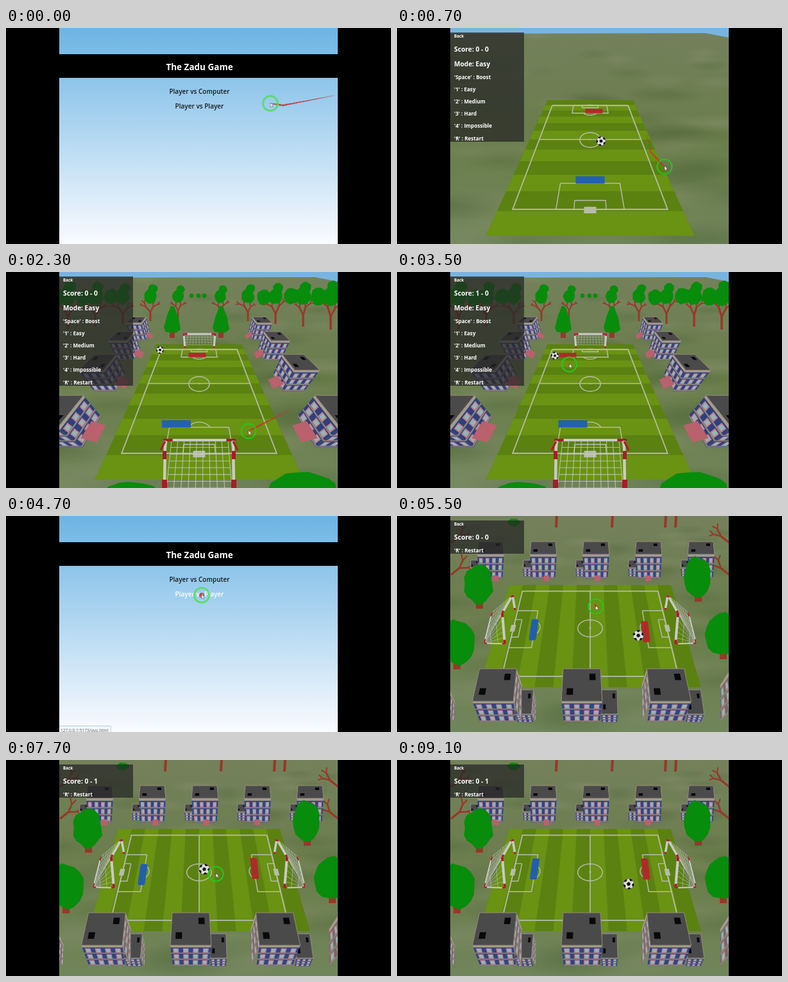
An HTML page with a canvas for the animation above (9.2 s loop, 600 by 338 pixels).

```html
<!DOCTYPE html>
<html lang="en">
<head>
<meta charset="utf-8">
<title>The Zadu Game</title>
<style>
html, body { margin: 0; width: 100%; height: 100%; overflow: hidden; background: #000; }
canvas { display: block; }
</style>
</head>
<body>
<canvas id="stage" width="600" height="338"></canvas>
<script>
const g = document.getElementById('stage').getContext('2d');
const LOOP = 9200, STEP = 100, TAU = Math.PI * 2, MID = 301;
const LEAF = '#078c0c', BARK = '#963828', CHALK = '#b5bda8', POLE = '#c9cac6', RED = '#a81c2b', INK = '#08090a';

const rnd = n => { const s = Math.sin(n * 12.9898) * 43758.5453; return s - Math.floor(s); };
const mix = (a, b, k) => a.map((v, i) => v + (b[i] - v) * k);

// Linear interpolation through keys of the form [time, ...values]
function at(keys, t) {
  const i = keys.findIndex(k => k[0] > t);
  if (i < 0) return keys[keys.length - 1].slice(1);
  if (!i) return keys[0].slice(1);
  const a = keys[i - 1], b = keys[i];
  return mix(a, b, (t - a[0]) / (b[0] - a[0])).slice(1);
}

function path(pts, close) {
  g.beginPath();
  pts.forEach(p => g.lineTo(p[0], p[1]));
  if (close) g.closePath();
}
function fill(pts, color) { path(pts, true); g.fillStyle = color; g.fill(); }
function line(pts, color, width) { path(pts); stroke(color, width); }
function stroke(color, width) { g.strokeStyle = color; g.lineWidth = width; g.stroke(); }
function ring(x, y, r, color, width) { g.beginPath(); g.arc(x, y, r, 0, TAU); stroke(color, width); }
function rect(x, y, w, h, color) { g.fillStyle = color; g.fillRect(x, y, w, h); }
function text(s, x, y, size, color = '#fff', weight = 700, align = 'left') {
  g.font = `${weight} ${size}px "Open Sans", "Noto Sans", sans-serif`;
  g.textAlign = align;
  g.fillStyle = color;
  g.fillText(s, x, y);
}

// ---- pitch ----
// Maps the ground rectangle [-1,1] x [-1,1] to a trapezium in perspective
const camera = (w0, w1, y0, y1) => (u, v) => {
  const w = 1 / (1 / w0 + (1 / w1 - 1 / w0) * (v + 1) / 2);
  return [MID + u * w, y0 + (w - w0) / (w1 - w0) * (y1 - y0)];
};
const lengthwise = camera(66.5, 162.5, 113, 325);
const across = camera(126, 173, 108, 268);
const sideways = (a, b) => across(-b, a);

function arc(P, cb, from, to, width) {
  const pts = [];
  for (let i = 0; i <= 40; i++) {
    const q = from + (to - from) * i / 40;
    pts.push(P(0.17 * Math.cos(q), cb + 0.132 * Math.sin(q)));
  }
  line(pts, CHALK, width);
}

function pitch(P) {
  const quad = (a, b0, b1) => [P(-a, b0), P(a, b0), P(a, b1), P(-a, b1)];
  const box = (a, b0, b1, w) => { const q = quad(a, b0, b1); line([...q, q[0]], CHALK, w); };
  fill(quad(1, -1, 1), '#5b8111');
  for (let i = 1; i < 12; i += 2) fill(quad(1, i / 6 - 1, (i + 1) / 6 - 1), '#6a9213');
  box(0.84, -0.82, 0.82, 1.8);
  line([P(-0.84, 0), P(0.84, 0)], CHALK, 1.6);
  arc(P, 0, 0, TAU, 1.5);
  fill(quad(0.012, -0.01, 0.01), CHALK);
  for (const s of [-1, 1]) {
    box(0.37, s * 0.59, s * 0.82, 1.5);
    box(0.175, s * 0.748, s * 0.82, 1.4);
    fill(quad(0.066, s * 0.8, s * 0.85), CHALK);
    const mid = s > 0 ? Math.PI * 1.5 : Math.PI / 2;
    arc(P, s * 0.667, mid - 0.94, mid + 0.94, 1.4);
  }
}

function ground(seed) {
  const base = g.createLinearGradient(0, 0, 0, 338);
  ['#74815c', '#6a7d4b', '#71855a'].forEach((c, i) => base.addColorStop(i / 2, c));
  rect(83, 0, 434, 338, base);
  for (let i = 0; i < 60; i++) {
    const y = 12 + rnd(seed + i) * 326, r = 8 + y / 10;
    g.save();
    g.translate(83 + rnd(seed + i + 99) * 434, y);
    g.scale(2.5, 0.7);
    const blob = g.createRadialGradient(0, 0, 0, 0, 0, r);
    const c = i % 2 ? '60,85,40' : '150,155,125';
    blob.addColorStop(0, `rgba(${c},.2)`);
    blob.addColorStop(1, `rgba(${c},0)`);
    rect(-r, -r, 2 * r, 2 * r, blob);
    g.restore();
  }
}

// ---- trees ----
function leaf(x, y, rx, ry) {
  const pts = [];
  for (let i = 0; i < 18; i++) {
    const q = i / 18 * TAU, k = 0.9 + 0.17 * rnd(x + i);
    pts.push([x + rx * k * Math.cos(q), y + ry * k * Math.sin(q)]);
  }
  fill(pts, LEAF);
}

function tree(x, y, rx, ry) {
  rect(x - 4, y + ry - 6, 11, 13, BARK);
  leaf(x, y, rx, ry);
}

function branch(x, y, len, dir, depth, seed) {
  const x2 = x + Math.cos(dir) * len, y2 = y + Math.sin(dir) * len;
  line([[x, y], [x2, y2]], BARK, 0.8 + len / 7);
  if (!depth) return;
  for (const s of [-1, 1])
    branch(x2, y2, len * (0.6 + 0.2 * rnd(seed + s)), dir + s * (0.3 + 0.4 * rnd(seed * 2 + s)), depth - 1, seed * 2 + s);
}

// Row of trees, growing towards both edges of the stage
function forest() {
  for (let i = -5; i <= 5; i++) {
    const far = Math.abs(i) / 5, x = MID + i * 43 - Math.sign(i) * 10, size = 8 + 5 * far;
    if (!i) {
      for (const dx of [-12, -1, 8]) leaf(x + dx, 37, 3.5, 3.5);
      continue;
    }
    branch(x, 68 + 22 * far, 10 + 10 * far, -Math.PI / 2, 3, i + 9);
    leaf(x, 38, size, size * 1.15);
    leaf(x + 4, 37 - size * 1.1, size * 0.75, size * 0.7);
    if (far > 0.5) leaf(x - 18, 33 + 12 * rnd(i), size, size * 1.1);
  }
}

function fir(x) {
  rect(x - 4, 91, 8, 12, BARK);
  fill([[x - 2, 53], [x + 3, 54], [x + 10, 72], [x + 13, 90], [x + 6, 95], [x - 10, 94], [x - 13, 87], [x - 8, 68]], LEAF);
}

// ---- houses ----
// Wall with three rows of windows inside the quad q (clockwise from top left)
function wall(q, cols, color = '#34447f') {
  const p = (u, v) => mix(mix(q[0], q[1], u), mix(q[3], q[2], u), v);
  const part = (u, v, w, h, c) => fill([p(u, v), p(u + w, v), p(u + w, v + h), p(u, v + h)], c);
  fill(q, color);
  part(0, 0, 1, 0.1, '#a69b89');
  for (let r = 0; r < 3; r++) {
    const v = 0.15 + r * 0.29;
    part(0, v + 0.21, 1, 0.05, '#8d867e');
    for (let c = 0; c < cols; c++) {
      const u = (c + 0.22) / cols, w = 0.56 / cols;
      part(u, v, w, 0.21, '#bd7f88');
      part(u + w * 0.18, v + 0.03, w * 0.64, 0.15, '#93b5b8');
    }
  }
}

function roof(q) {
  const tile = (u, v) => {
    const p = (a, b) => mix(mix(q[0], q[1], a), mix(q[3], q[2], a), b);
    fill([p(u, v), p(u + 0.16, v), p(u + 0.16, v + 0.2), p(u, v + 0.2)], INK);
  };
  fill(q, '#4a4a4b');
  line([...q, q[0]], '#958c7d', 1);
  tile(0.12, 0.6);
  tile(0.7, 0.15);
}

// Point at height h above the lengthwise ground, seen by a tilted camera
const FOCAL = 220, TILT = 0.745;
function lift(u, b, h) {
  const y = lengthwise(u, b)[1], depth = FOCAL * 2.208 / (y + 34);
  const near = depth - h * Math.sin(TILT), up = (169 - y) * depth / FOCAL + h * Math.cos(TILT);
  return [MID + FOCAL * u / near, 169 - FOCAL * up / near];
}

function streetHouse(side, b1) {
  const b0 = b1 - 0.3, u0 = 1.3, u1 = 1.64, h = 0.42;
  const P = (u, b, z) => lift(side * u, b, z);
  const inner = (u, z) => [P(u, b0, z), P(u, b1, z), P(u, b1, 0), P(u, b0, 0)];
  wall(inner(u0, h), 3, '#303f7c');
  wall([P(u0, b1, h), P(u1, b1, h), P(u1, b1, 0), P(u0, b1, 0)], 3);
  roof([P(u0, b0, h), P(u1, b0, h), P(u1, b1, h), P(u0, b1, h)]);
  const c = b1 - 0.12;
  fill([P(u0, c - 0.08, 0.1), P(u0, c + 0.08, 0.1), P(1.17, c + 0.08, 0), P(1.17, c - 0.08, 0)], '#b9616d');
}

// Roof of depth d over a front wall of height h
function block(x, y, w, d, h, lean = 0, cols = 4) {
  const a = w / 2, b = a * 1.1, c = a * 0.97, y1 = y + d, y2 = y1 + h;
  const edge = x - Math.sign(lean) * a;
  wall([[edge, y], [edge - lean, y + d / 2], [edge - lean, y2], [edge + lean, y1]], 3, '#6f6c68');
  wall([[x + lean - b, y1], [x + lean + b, y1], [x + c, y2], [x - c, y2]], cols);
  roof([[x - a, y], [x + a, y], [x + lean + b, y1], [x + lean - b, y1]]);
}

function backHouse(x) {
  block(x - 25, 69, 12, 12, 14, 0, 2);
  block(x, 40, 38, 20, 38);
  rect(x - 2 + (MID - x) / 30, 93, 9, 9, '#b9616d');
}

function frontHouse(x) {
  const lean = (x - 288) / 16;
  block(x + 43, 272, 24, 38, 13, lean / 2, 3);
  block(x, 239, 58, 51, 32, lean);
}

// ---- goals ----
function net(q, n, m, width) {
  const draw = (a, b) => line([a, b], 'rgba(205,208,202,.75)', width);
  for (let i = 0; i <= n; i++) draw(mix(q[0], q[1], i / n), mix(q[3], q[2], i / n));
  for (let i = 0; i <= m; i++) draw(mix(q[0], q[3], i / m), mix(q[1], q[2], i / m));
}

// Pole with red ends
function pole(a, b, width) {
  line([a, b], POLE, width);
  line([a, mix(a, b, 0.13)], RED, width);
  line([mix(a, b, 0.87), b], RED, width);
}

function farGoal() {
  net([[279, 98], [323, 98], [325, 114], [277, 114]], 10, 4, 0.5);
  pole([276, 97], [327, 97], 3);
  pole([277, 97], [279, 119], 3);
  pole([326, 97], [324, 119], 3);
}

function nearGoal() {
  net([[258, 264], [346, 264], [352, 338], [250, 338]], 9, 7, 1.1);
  pole([245, 263], [358, 263], 4);
  for (const s of [-1, 1]) {
    line([[MID + s * 53, 264], [MID + s * 54, 338]], POLE, 4.5);
    rect(MID + s * 54 - 3, 280, 6, 13, RED);
    rect(MID + s * 54 - 4, 325, 8, 13, RED);
    line([[MID + s * 53, 265], [MID + s * 60, 279]], RED, 3);
  }
}

function sideGoal(s) {
  const p = (x, y) => [MID - s * x, y];
  const far = p(121, 124), near = p(137, 152), back = p(165, 199), rear = p(153, 151), foot = p(133, 200);
  net([far, near, back, rear], 6, 7, 0.7);
  net([near, foot, back, back], 5, 3, 0.7);
  pole(far, near, 3.5);
  pole(far, p(117, 147), 3.5);
  pole(near, foot, 4);
  pole(rear, back, 2);
  pole(back, foot, 2);
}

// ---- moving parts ----
function ball(x, y, r) {
  const turn = x / 20;
  const patch = (px, py, k) => fill([0, 1, 2, 3, 4].map(i => {
    const q = i / 5 * TAU + 0.4 + turn;
    return [px + k * Math.cos(q), py + k * Math.sin(q)];
  }), '#101010');
  g.save();
  g.beginPath();
  g.arc(x, y, r, 0, TAU);
  g.fillStyle = '#dcddd9';
  g.fill();
  g.clip();
  patch(x, y, r * 0.37);
  for (let i = 0; i < 5; i++) {
    const q = i / 5 * TAU + 1 + turn;
    patch(x + r * 0.94 * Math.cos(q), y + r * 0.94 * Math.sin(q), r * 0.35);
  }
  g.restore();
  ring(x, y, r - 0.3, '#35382e', 0.6);
}

function paddle(x, y, lean, color) {
  path([[x - 3 - lean, y - 14], [x + 3 - lean, y - 14], [x + 3 + lean, y + 14], [x - 3 + lean, y + 14]], true);
  g.fillStyle = color;
  g.lineJoin = 'round';
  g.fill();
  stroke(color, 5);
  g.lineJoin = 'miter';
}

function hud(score, rows, top, height) {
  rect(83, 7, 115, height, 'rgba(38,38,38,.73)');
  text('Back', 89, 14.5, 6.3);
  text(`Score: ${score}`, 89, 37, 10.3);
  rows.forEach((s, i) => text(s, 89, top + i * 19.2, 8.1));
}

const cursorKeys = [[0, 412, 118], [300, 306, 100], [400, 308, 101], [600, 389, 165], [650, 396, 195], [700, 417, 217],
  [1500, 400, 235], [2200, 450, 212], [2300, 378, 249], [3300, 270, 148], [3600, 268, 143], [4000, 96, 13],
  [4200, 96, 13], [4500, 300, 122], [4700, 305, 124], [5000, 305, 124], [6400, 318, 173], [8100, 330, 180],
  [8800, 640, 150], [9100, 640, 100], [9101, 515, 105], [9180, 432, 121], [9200, 412, 118]];
const cursorAt = t => at(cursorKeys, (t + LOOP) % LOOP);

function cursor(t, inMenu) {
  const [x, y] = cursorAt(t), trail = 95, n = 19;
  g.lineCap = 'round';
  for (let i = 0; i < n; i++) {
    const from = t - trail + i * trail / n;
    line([cursorAt(from), cursorAt(from + trail / n)], 'rgba(196,52,52,.8)', 0.5 + 2.6 * Math.min(i / n, (n - i) / 4));
  }
  g.lineCap = 'butt';
  ring(x, y, 11.5, inMenu ? 'rgba(82,222,100,.85)' : '#23c81d', inMenu ? 3 : 2);
  if (pressing(t)) ring(x, y, 3, '#c8524e', 2);
  const tip = [[0, -1], [0, 5.5], [1.5, 4.2], [2.6, 6.2], [3.5, 5.7], [2.5, 3.8], [4.4, 3.6]].map(p => [x + p[0], y + p[1]]);
  fill(tip, '#fff');
  line([...tip, tip[0]], '#333', 0.4);
}

// ---- screens ----
const pressing = t => t >= 4600 && t < 4900;

function menu(t) {
  const sky = g.createLinearGradient(0, 0, 0, 338);
  sky.addColorStop(0, '#6cb4e4');
  sky.addColorStop(1, '#fafbff');
  rect(83, 0, 434, 338, sky);
  rect(83, 41, 434, 37, '#000');
  text('The Zadu Game', 301.5, 66, 13.5, '#fff', 700, 'center');
  const [x, y] = cursorAt(t);
  ['Player vs Computer', 'Player vs Player'].forEach((s, i) => {
    const base = 103 + i * 23, over = Math.abs(x - MID) < 48 && Math.abs(y - base + 3.5) < 8;
    text(s, 301.5, base, 10, over ? '#fff' : '#15191c', 600, 'center');
  });
  if (pressing(t)) {
    rect(82.5, 328, 81, 10, '#8fbdd6');
    rect(83, 328.7, 80, 10, '#f3f6f9');
    text('127.0.0.1:5173/pvp.html', 85, 338, 6.6, '#5f6468', 400);
  }
}

const soloBall = [[400, 301, 175], [700, 318, 177], [1000, 336, 184], [1500, 289, 229], [2300, 240, 122], [2399, 238, 117],
  [2400, 301, 175], [2900, 284, 229], [3500, 246, 131], [4200, 272, 229]];
const soloBlue = [[700, 301], [2300, 265.5], [2900, 280], [3500, 274]];
const soloRed = [[700, 307], [2300, 298], [3500, 266], [4200, 274]];

function solo(t) {
  const loaded = t >= 1000;
  ground(5);
  fill([[83, 0], [517, 0], [517, 15], [481, 8], [83, 9]], '#79b4e0');
  if (loaded) {
    forest();
    fir(259);
    fir(335);
  }
  pitch(lengthwise);
  if (loaded) {
    farGoal();
    for (let k = -2; k < 2; k++) for (const side of [-1, 1]) streetHouse(side, 0.13 + 0.64 * k);
  }
  const [red] = at(soloRed, t), [blue] = at(soloBlue, t), [x, y] = at(soloBall, t);
  rect(red - 13.5, 126.5, 27, 7, '#ad2b27');
  rect(blue - 22.5, 232, 45, 11.5, '#2360b0');
  ball(x, y, 6 + (y - 122) * 0.027);
  if (loaded) {
    nearGoal();
    leaf(195, 339, 37, 10);
    leaf(463, 340, 52, 27);
  }
  hud(t < 2400 ? '0 - 0' : '1 - 0', ["'Space' : Boost", "'1' : Easy", "'2' : Medium", "'3' : Hard", "'4' : Impossible", "'R' : Restart"], 79.5, 171);
  text('Mode: Easy', 89, 59.5, 10.1);
}

const duoBall = [[4900, 301, 175], [5500, 376, 187], [6400, 227, 156], [6699, 178, 148], [6700, 301, 175],
  [7300, 377, 166], [8200, 224, 177], [9100, 361, 194]];
const duoBlue = [[5800, 178], [6400, 187.5], [9100, 170.5]];
const duoRed = [[4900, 175], [5500, 181], [6400, 169], [9100, 170.5]];

function duo(t) {
  const loaded = t >= 5300;
  ground(40);
  if (loaded) {
    for (const x of [248, 335, 418, 434]) line([[x + 1, -2], [x, 18]], BARK, 4);
    for (const s of [-1, 1]) for (const y of [42, 92])
      branch(MID + s * 217, y, 17, -Math.PI / 2 - s * 0.9, 2, y + s);
    leaf(182, 10, 10, 6);
  }
  pitch(sideways);
  if (loaded) {
    for (let i = -2; i <= 2; i++) backHouse(310 + i * 82);
    sideGoal(1);
    sideGoal(-1);
    tree(127, 107, 23, 31);
    tree(468, 95, 21, 32);
    tree(92, 198, 29, 35);
    tree(507, 184, 28, 33);
  }
  const [blue] = at(duoBlue, t), [red] = at(duoRed, t), [x, y] = at(duoBall, t);
  paddle(214.5 - (blue - 170.5) * 0.18, blue, -2, '#225eae');
  paddle(387.3, red, 1.5, '#b02a2a');
  ball(x, y, 8.5);
  if (loaded) {
    for (let i = -2; i <= 2; i++) frontHouse(288 + i * 130.5);
  }
  hud(t < 6700 ? '0 - 0' : '0 - 1', ["'R' : Restart"], 56.8, 52);
}

function frame(now) {
  const t = Math.floor(now % LOOP / STEP) * STEP;
  const inMenu = t < 400 || (t >= 4200 && t < 4900);
  rect(0, 0, 600, 338, '#000');
  g.save();
  g.beginPath();
  g.rect(83, 0, 434, 338);
  g.clip();
  (inMenu ? menu : t < 4200 ? solo : duo)(t);
  g.restore();
  cursor(t, inMenu);
  requestAnimationFrame(() => frame(performance.now() - start));
}
const start = performance.now();
frame(0);
</script>
</body>
</html>
```
